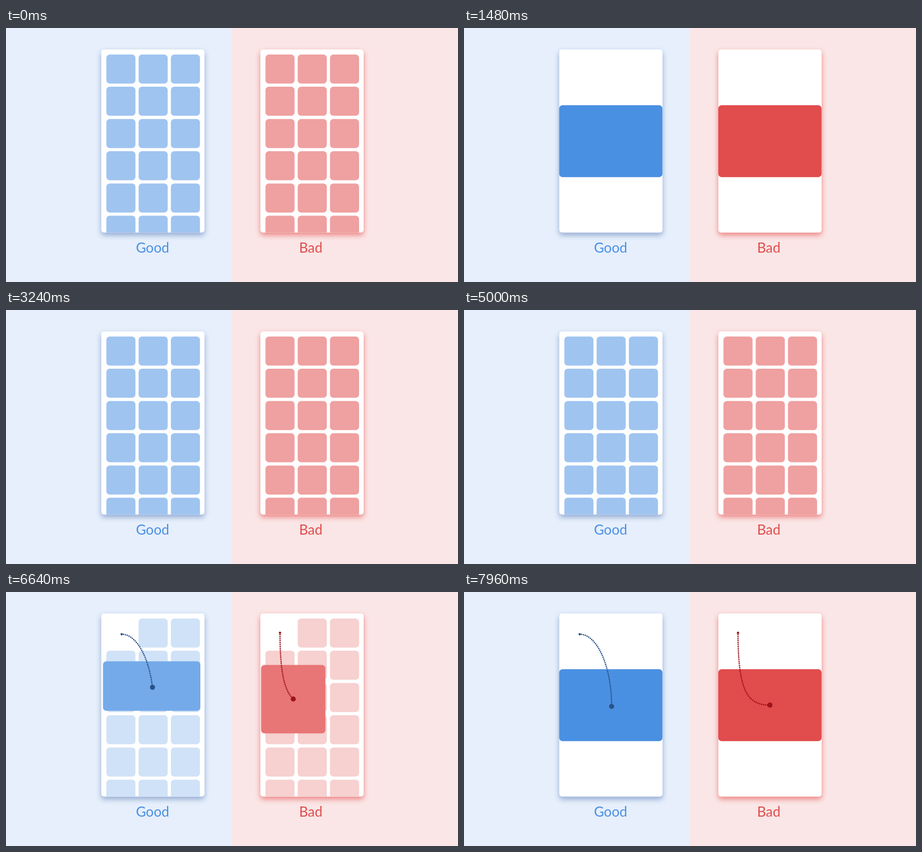
An HTML page with a canvas for the animation above (8 s loop, 800x450 px).

```html
<!DOCTYPE html>
<html lang="en">
<head>
<meta charset="utf-8">
<title>Good and bad arc motion</title>
<style>
  html, body { margin: 0; overflow: hidden; }
  canvas { display: block; }
</style>
</head>
<body>
<canvas id="stage" width="800" height="450"></canvas>
<script>
const ctx = document.getElementById('stage').getContext('2d');
const LOOP = 8000, SPAN = 1600;
const CELL = 51.5, PITCH = 57.1, CARD_W = 182.8, CARD_H = 324.5, TOP = 38;
const HERO_H = 127.5, TRAVEL_X = 56.5, TRAVEL_Y = 127.8, PALE = .53;

const clamp = v => Math.min(1, Math.max(0, v));
const mix = (a, b, k) => a + (b - a) * k;
const bezier = (a, b, c, d, s) => {
  const r = 1 - s;
  return r * r * r * a + 3 * r * r * s * b + 3 * r * s * s * c + s * s * s * d;
};

// Cubic easing (.57, 0, .14, 1), solved by bisection
function ease(u) {
  if (u <= 0) return 0;
  if (u >= 1) return 1;
  let lo = 0, hi = 1;
  for (let i = 0; i < 24; i++) {
    const s = (lo + hi) / 2;
    if (bezier(0, .57, .14, 1, s) < u) lo = s; else hi = s;
  }
  return bezier(0, 0, 1, 1, lo);
}

// Arc from the first cell to the card centre, measured by length
function makePath(p1, p2) {
  const pts = [];
  let length = 0;
  for (let i = 0; i <= 200; i++) {
    const s = i / 200;
    const x = TRAVEL_X * bezier(0, p1[0], p2[0], 1, s);
    const y = TRAVEL_Y * bezier(0, p1[1], p2[1], 1, s);
    if (i) length += Math.hypot(x - pts[i - 1].x, y - pts[i - 1].y);
    pts.push({ x, y, d: length });
  }
  const at = d => {
    const i = Math.max(1, pts.findIndex(p => p.d >= d - 1e-6));
    const a = pts[i - 1], b = pts[i], k = clamp((d - a.d) / (b.d - a.d));
    return { x: mix(a.x, b.x, k), y: mix(a.y, b.y, k) };
  };
  return { length, at };
}

const panels = [
  { x: 0, card: 168.6, label: 'Good', labelX: 259.4, back: '#e6effb', rgb: [74, 144, 226],
    dark: '#28538a', shadow: 'rgba(55,95,165,.48)', path: makePath([.552, 0], [1, .448]),
    wide: true, dot: [1.4, 2.1] },
  { x: 400, card: 450.2, label: 'Bad', labelX: 539.4, back: '#fae6e6', rgb: [225, 76, 76],
    dark: '#9e1418', shadow: 'rgba(230,60,60,.58)', path: makePath([0, .84], [.33, 1]),
    wide: false, dot: [0, -.3] }
];

// Progress of every part at a time in the transition
function pose(ms, back) {
  const part = (delay, span, curve) => back
    ? 1 - curve(clamp((ms - (SPAN - delay - span)) / span))
    : curve(clamp((ms - delay) / span));
  return {
    move: part(0, SPAN, ease),
    lead: part(20, 1200, ease),
    lag: part(340, 1220, ease),
    tint: part(0, SPAN, u => u),
    fade: part(0, SPAN, u => (1 - Math.cos(Math.PI * u)) / 2)
  };
}

function poseAt(t) {
  if (t < 3000) return pose((t - 1020) / 420 * SPAN);
  if (t < 5832) return pose((t - 3000) / 240 * SPAN, true);
  return pose(t - 5832);
}

const tone = (rgb, k) => `rgb(${rgb.map(c => mix(255, c, k)).join()})`;

function box(x, y, w, h, r, fill) {
  ctx.fillStyle = fill;
  ctx.beginPath();
  ctx.roundRect(x, y, w, h, r);
  ctx.fill();
}

function disc(x, y, r) {
  ctx.beginPath();
  ctx.arc(x, y, r, 0, 2 * Math.PI);
  ctx.fill();
}

function drawPanel(p, q, trail) {
  ctx.fillStyle = p.back;
  ctx.fillRect(p.x, 0, 400, 450);

  ctx.save();
  ctx.shadowColor = p.shadow;
  ctx.shadowBlur = 10;
  ctx.shadowOffsetY = 4.5;
  box(p.card, TOP, CARD_W, CARD_H, 5, '#fff');
  ctx.restore();

  const left = p.card + 9, top = TOP + 9;
  ctx.save();
  ctx.beginPath();
  ctx.roundRect(p.card, TOP, CARD_W, CARD_H, 5);
  ctx.clip();
  for (let i = 1; i < 18 && q.fade < 1; i++) {
    box(left + i % 3 * PITCH, top + Math.floor(i / 3) * PITCH, CELL, CELL, 6,
      tone(p.rgb, PALE * (1 - q.fade)));
  }
  ctx.restore();

  const startX = left + CELL / 2, startY = top + CELL / 2;
  const run = q.move * p.path.length, pos = p.path.at(run);
  const w = mix(CELL, CARD_W, p.wide ? q.lead : q.lag);
  const h = mix(CELL, HERO_H, p.wide ? q.lag : q.lead);
  box(startX + pos.x - w / 2, startY + pos.y - h / 2, w, h, 6, tone(p.rgb, mix(PALE, 1, q.tint)));

  if (trail) {
    const x = startX + p.dot[0], y = startY + p.dot[1];
    ctx.fillStyle = p.dark;
    disc(x, y, 2.1);
    for (let d = 3.4; d < run; d += 3.4) {
      const a = p.path.at(d);
      disc(x + a.x, y + a.y, 1.25);
    }
    disc(x + pos.x, y + pos.y, 4.5);
  }

  ctx.fillStyle = tone(p.rgb, 1);
  ctx.font = '24.4px Lato, sans-serif';
  ctx.textAlign = 'center';
  ctx.fillText(p.label, p.labelX, 398);
}

function frame(now) {
  const t = now % LOOP, q = poseAt(t);
  for (const p of panels) drawPanel(p, q, t >= 5870);
  requestAnimationFrame(frame);
}
requestAnimationFrame(frame);
</script>
</body>
</html>
```
